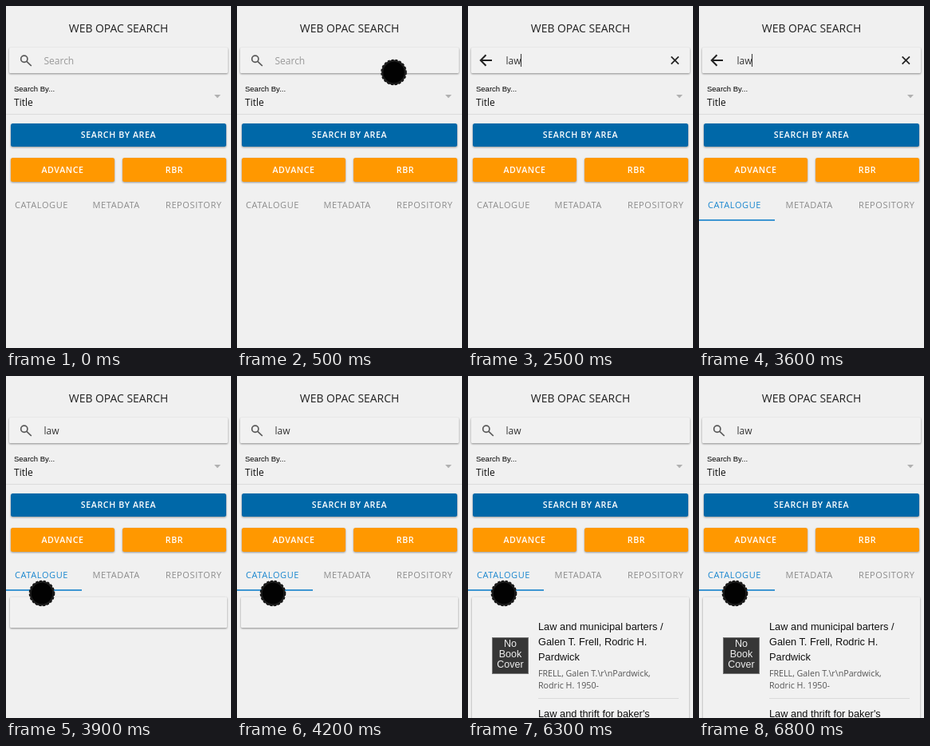
These frames come from a looping animation (282 by 428 pixels, 7.1 s). An HTML page:

```html
<!DOCTYPE html>
<html lang="en">
<head>
<meta charset="utf-8">
<title>Library search</title>
<style>
  html, body { margin: 0; width: 100%; height: 100%; overflow: hidden; background: #f0f0f0; }
  svg { display: block; width: 282px; height: 428px; }
  text { font-family: "Open Sans", "Noto Sans", sans-serif; font-size: 12px; fill: #222; }
  .arial { font-family: "Liberation Sans", Arial, sans-serif; }
  .mid { text-anchor: middle; }
  .button { font-size: 10.6px; font-weight: 600; letter-spacing: .63px; fill: #fff; }
  .tab { font-size: 11px; letter-spacing: .6px; fill: #8c8c8c; }
  .tab.active { fill: #1c87cf; }
  .heading { font-size: 12.8px; fill: #111; }
  .note { font-size: 10.7px; fill: #555; }
  .cover { font-size: 12.5px; fill: #eee; }
  .raised { filter: drop-shadow(0 1px 1px rgba(0, 0, 0, .38)); }
  .panel { fill: #f1f1f1; filter: drop-shadow(0 1px 1.2px rgba(0, 0, 0, .42)); }
  .line { fill: none; stroke-width: 2; }
</style>
</head>
<body>
<svg viewBox="0 0 282 428">
  <rect width="282" height="428" fill="#f0f0f0"/>
  <text class="mid" x="141" y="33" style="font-size:13.9px">WEB OPAC SEARCH</text>

  <rect class="panel" x="4" y="52" width="274" height="32" rx="1.5"/>
  <g id="lens" class="line" stroke="#5a5a5a" style="stroke-width:1.7">
    <circle cx="22.8" cy="66.2" r="4.1"/>
    <path d="M25.9 69.3L31.8 75"/>
  </g>
  <path id="back" class="line" stroke="#222" d="M30 68H16M22.5 61.3L15.8 68L22.5 74.7"/>
  <text id="query" x="47.5" y="73"></text>
  <rect id="caret" y="60" width="1" height="16" fill="#333"/>
  <path id="clear" class="line" stroke="#222" style="stroke-width:1.7" d="M254.7 63.3L264 72.7M264 63.3L254.7 72.7"/>

  <text class="arial" x="10" y="107" style="font-size:9.5px;fill:#000">Search By...</text>
  <text x="10" y="125" style="fill:#111">Title</text>
  <path d="M261 111H269L265 115.3Z" fill="#b0b0b0"/>
  <rect y="135" width="282" height="1" fill="#dcdcdc"/>

  <g class="raised">
    <rect x="6" y="147" width="270" height="29" rx="2.5" fill="#0068a8"/>
    <rect x="6" y="190" width="130" height="30" rx="2.5" fill="#ff9800"/>
    <rect x="146" y="190" width="130" height="30" rx="2.5" fill="#ff9800"/>
  </g>
  <text class="button mid" x="141" y="165">SEARCH BY AREA</text>
  <text class="button mid" x="71" y="209">ADVANCE</text>
  <text class="button mid" x="211" y="209">RBR</text>

  <text id="catalogue" class="tab" x="11" y="253">CATALOGUE</text>
  <text class="tab" x="108.5" y="253">METADATA</text>
  <text class="tab" x="200" y="253">REPOSITORY</text>
  <rect id="marker" y="267" width="95" height="2" fill="#3d96d2"/>

  <rect id="card" class="panel" x="5" y="276.5" width="272" height="38.5" rx="1.5"/>
  <g id="results">
    <rect x="30.5" y="327.5" width="45" height="45" fill="#363636" stroke="#777"/>
    <text class="arial cover mid" x="53" y="339">No</text>
    <text class="arial cover mid" x="53" y="352">Book</text>
    <text class="arial cover mid" x="53" y="365">Cover</text>
    <text class="arial heading" x="88" y="318">Law and municipal barters /</text>
    <text class="arial heading" x="88" y="337">Galen T. Frell, Rodric H.</text>
    <text class="arial heading" x="88" y="356">Pardwick</text>
    <text class="note" x="88" y="376">FRELL, Galen T.\r\nPardwick,</text>
    <text class="note" x="88" y="390.5">Rodric H. 1950-</text>
    <rect x="88" y="403" width="176" height="1" fill="#dadada"/>
    <text class="arial heading" x="88" y="427">Law and thrift for baker's</text>
  </g>

  <g id="touch">
    <circle r="15.4" fill="#1c1c1c"/>
    <circle r="13.2" fill="#020202"/>
    <circle r="15.6" fill="none" stroke="#111" stroke-width="1.4" stroke-dasharray="3 2"/>
  </g>
</svg>
<script>
  const LOOP = 7100;
  const FOCUS = 700, BLUR = 3800;
  const KEYS = [1700, 1900, 2300];
  const CARET_X = [47, 51, 57, 66];
  const BLINK = 500;

  const el = id => document.getElementById(id);
  const show = (id, on) => el(id).setAttribute("visibility", on ? "visible" : "hidden");
  const within = (t, from, to) => t >= from && t < to;

  function render(t) {
    const focused = within(t, FOCUS, BLUR);
    const typed = KEYS.filter(key => t >= key).length;

    show("lens", !focused);
    show("back", focused);
    show("clear", focused && typed > 0);

    const query = el("query");
    query.textContent = typed ? "law".slice(0, typed) : "Search";
    query.style.fill = typed ? "#333" : "#999";

    // Each key press restarts the blink.
    const blinkStart = typed ? KEYS[typed - 1] : 800;
    const lit = Math.floor(Math.max(0, t - blinkStart) / BLINK) % 2 === 0;
    el("caret").setAttribute("x", CARET_X[typed]);
    show("caret", focused && lit);

    const searched = t >= 3400;
    el("catalogue").classList.toggle("active", searched);
    show("marker", searched);

    const loaded = t >= 6200;
    show("card", t >= 3700);
    el("card").setAttribute("height", loaded ? 170 : 38.5);
    show("results", loaded);

    const firstTap = within(t, 300, 900);
    show("touch", firstTap || t >= BLUR);
    el("touch").setAttribute("transform", firstTap ? "translate(196.5 83)" : "translate(45 272)");
  }

  const start = performance.now();
  function tick() {
    render((performance.now() - start) % LOOP);
    requestAnimationFrame(tick);
  }
  tick();
</script>
</body>
</html>
```
